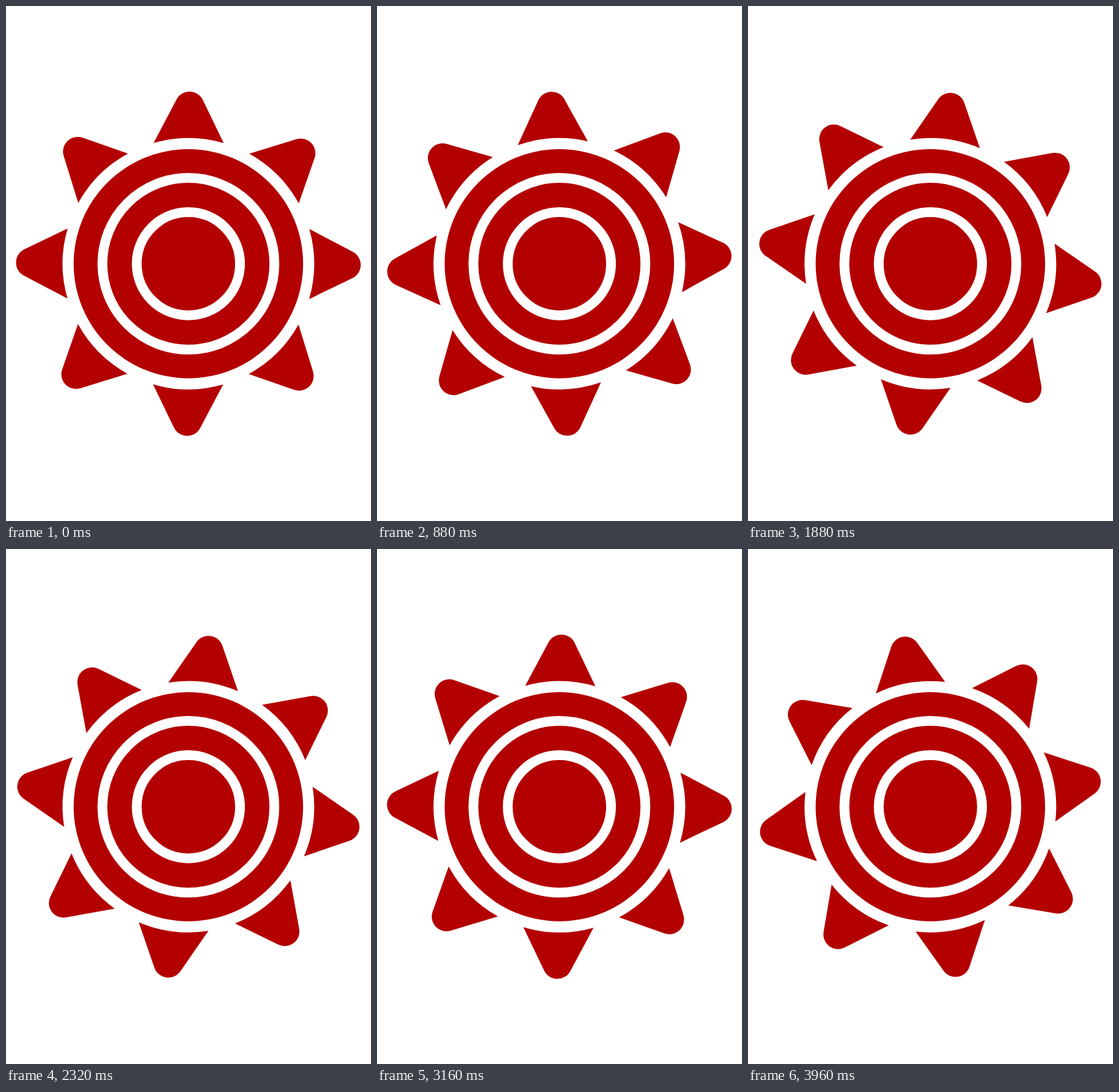
Animation, 596 px wide and 842 px high, one loop 4 s. Source, as an HTML page:

```html
<!DOCTYPE html>
<html lang="en">
<head>
<meta charset="utf-8">
<title>Turning sun</title>
<style>
  html, body { margin: 0; width: 100%; height: 100%; overflow: hidden; background: #fff; }
  svg { display: block; width: 596px; height: 842px; }
</style>
</head>
<body>
<svg viewBox="0 0 596 842" fill="#b30000">
  <defs>
    <path id="ray" d="M-57.3-197.3L-19.9-268.6A24 24 0 0 1 22.95-267.9L57.3-197.3A205.5 205.5 0 0 0-57.3-197.3Z"/>
  </defs>
  <g transform="translate(297.8 421.4)">
    <g id="rays"></g>
    <circle r="187.3"/>
    <g fill="none" stroke="#fff" stroke-width="16">
      <circle r="140.4"/>
      <circle r="84.3"/>
    </g>
  </g>
</svg>
<script>
  const LOOP = 4000;
  const FRAME = 40;
  const TICKS_PER_MS = 0.05994;
  const DEG_PER_MS = 0.1;
  const START_ANGLE = 0.13;

  const rays = document.getElementById('rays');
  for (let i = 0; i < 8; i++) {
    const ray = document.createElementNS('http://www.w3.org/2000/svg', 'use');
    ray.setAttribute('href', '#ray');
    ray.setAttribute('transform', `rotate(${i * 45})`);
    rays.append(ray);
  }

  // Steady turn, sampled on a 59.94 Hz clock and shown every 40 ms.
  function angleAt(ms) {
    const shown = Math.floor((ms % LOOP) / FRAME) * FRAME;
    const tick = Math.floor(shown * TICKS_PER_MS);
    return START_ANGLE + tick / TICKS_PER_MS * DEG_PER_MS;
  }

  const start = performance.now();
  function draw() {
    const elapsed = Math.max(0, performance.now() - start);
    rays.setAttribute('transform', `rotate(${angleAt(elapsed).toFixed(3)})`);
    requestAnimationFrame(draw);
  }
  draw();
</script>
</body>
</html>
```
